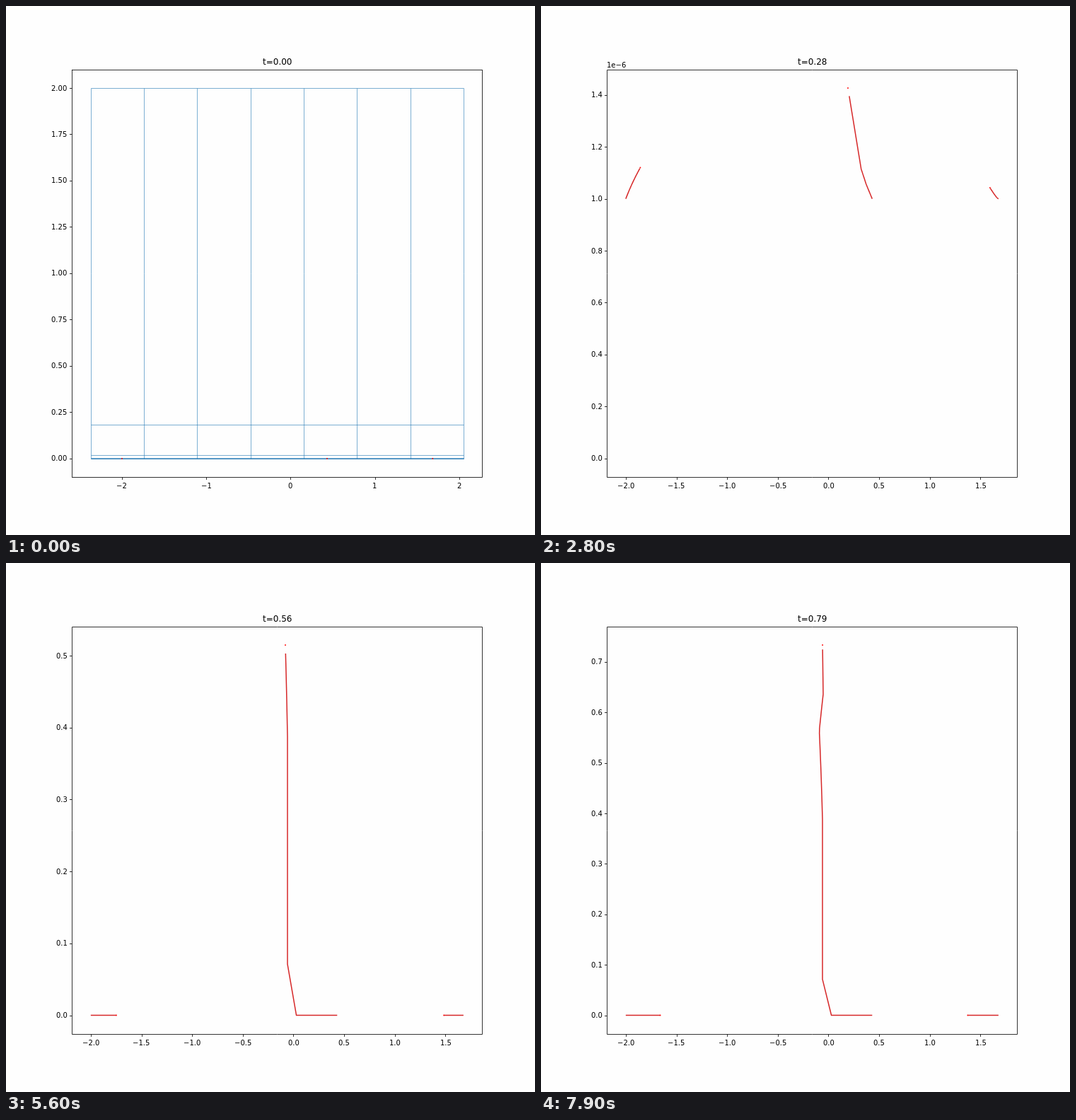
Recreate the animation shown at these times as an HTML page with a canvas. Size 748 by 748 pixels, loop 8 s.

```html
<!DOCTYPE html>
<html>
<head>
<meta charset="utf-8">
<style>
html, body { margin: 0; width: 100%; height: 100%; overflow: hidden; background: #fefefe; }
canvas { display: block; }
</style>
</head>
<body>
<canvas id="stage" width="748" height="748"></canvas>
<script>
const ctx = document.getElementById('stage').getContext('2d');
const STEPS = 80, STEP_MS = 100, JUMP = 36;
const L = 93.49, R = 673.2, T = 89.76, B = 665.72;
const X0 = 119.85, X1 = 646.85, Y0 = 639.54, Y1 = 115.94;
const MICRO = 1e-6;

const settle = u => 1 - Math.exp(-u / 8);
const snap = v => Math.floor(v + .5) + .5;

// Linear interpolation through [step, value] points
function along(n, ...points) {
  const i = Math.max(1, points.findIndex(p => p[0] >= n));
  const [a, from] = points[i - 1], [b, to] = points[i];
  return from + (to - from) * (n - a) / (b - a);
}

// Each particle gives its horizontal pixel and its height at step n
const leftParticle = n => [
  X0 + .55 * n + 5.3 * settle(n),
  MICRO * (1 + .0027 * n + .046 * settle(n))
];
const rightParticle = n => [
  X1 - .36 * n - .0024 * n * n,
  MICRO * (1 + .0004 * n ** 1.4)
];
function middleParticle(n) {
  const u = n - JUMP;
  if (u < 0) return [
    along(n, [0, 468.3], [12, 459.8], [18, 452.7], [28, 434], [35, 410.6]),
    MICRO * along(n, [0, 1], [12, 1.056], [18, 1.115], [28, 1.427], [35, 1.75])
  ];
  return [
    along(n, [JUMP, 398], [47, 398], [60.5, 393.5], [68, 399], [STEPS, 398]),
    .0713 + .0085 * u + .298 * settle(u)
  ];
}
const paths = [leftParticle, middleParticle, rightParticle]
  .map(particle => Array.from({ length: STEPS }, (_, n) => particle(n)));

function segment(x0, y0, x1, y1) {
  ctx.beginPath();
  ctx.moveTo(x0, y0);
  ctx.lineTo(x1, y1);
  ctx.stroke();
}

// Anchor: 0 left, .5 centre, 1 right
function text(s, x, y, anchor, size = 10) {
  ctx.font = size + 'px "DejaVu Sans", sans-serif';
  ctx.fillText(s, Math.round(x - anchor * ctx.measureText(s).width), y);
}

// At most nine intervals, each a round number
function ticks(lo, hi) {
  const pad = (hi - lo) * .05, raw = (hi - lo + 2 * pad) / 9;
  const exp = Math.floor(Math.log10(raw)), unit = 10 ** exp;
  const m = [1, 2, 2.5, 5, 10].find(s => s * unit >= raw);
  const step = m * unit, values = [];
  for (let i = Math.ceil((lo - pad) / step); i * step <= hi + pad; i++) values.push(i * step);
  const top = Math.max(...values.map(Math.abs));
  const order = Math.floor(Math.log10(top) + 1e-9), power = order <= -5 ? order : 0;
  const digits = Math.max(0, power - exp + (m === 2.5 ? 1 : m === 10 ? -1 : 0));
  const label = v => (v / 10 ** power).toFixed(digits).replace('-', '\u2212');
  return { values, label, power };
}

function axes(xLo, xHi, yHi, n) {
  ctx.strokeStyle = ctx.fillStyle = '#000';
  ctx.lineWidth = .8;
  ctx.strokeRect(snap(L), snap(T), snap(R) - snap(L), snap(B) - snap(T));
  const xs = ticks(xLo, xHi), ys = ticks(0, yHi);
  for (const v of xs.values) {
    const x = X0 + (v - xLo) / (xHi - xLo) * (X1 - X0);
    segment(snap(x), B + .7, snap(x), B + 4.2);
    text(xs.label(v), x, 682, .5);
  }
  for (const v of ys.values) {
    const y = Y0 + v / yHi * (Y1 - Y0);
    segment(L - 3.5, snap(y), L, snap(y));
    text(ys.label(v), L - 7, Math.round(y + 3.6), 1);
  }
  if (ys.power) text('1e\u2212' + -ys.power, L, 87, 0);
  text('t=' + (n / 100).toFixed(2), (L + R) / 2, 83, .5, 12);
}

function mesh() {
  ctx.strokeStyle = 'rgba(31,119,180,.58)';
  ctx.lineWidth = 1;
  for (let i = 0; i < 8; i++) {
    const x = snap(X0 + i * (X1 - X0) / 7);
    segment(x, snap(Y1), x, snap(Y0));
  }
  for (let k = 0; k < 7; k++) {
    const y = snap(Y0 + (Y1 - Y0) * 11.05 ** -k);
    segment(snap(X0), y, snap(X1), y);
  }
}

function dot(x, y) {
  ctx.fillStyle = '#f00';
  ctx.beginPath();
  ctx.arc(x, y, .95, 0, 7);
  ctx.fill();
}

function trails(n, yHi) {
  const py = y => Y0 + y / yHi * (Y1 - Y0);
  ctx.strokeStyle = '#d62728';
  ctx.lineWidth = 1.5;
  ctx.lineJoin = 'round';
  for (const path of paths) {
    ctx.beginPath();
    for (const [x, y] of path.slice(0, n)) ctx.lineTo(x, py(y));
    ctx.stroke();
    dot(path[n][0], py(path[n][1]));
  }
}

function draw(n) {
  ctx.fillStyle = '#fefefe';
  ctx.fillRect(0, 0, 748, 748);
  if (n === 0) {
    mesh();
    for (const x of [164, 454, 603.3]) dot(x, Y0 + .4);
    axes(-2.368, 2.05, 2, n);
  } else {
    const yHi = Math.max(...paths.flatMap(path => path.slice(0, n + 1).map(p => p[1])));
    trails(n, yHi);
    axes(-2, 1.677, yHi, n);
  }
}

function tick() {
  draw(Math.floor(performance.now() / STEP_MS) % STEPS);
  requestAnimationFrame(tick);
}
tick();
</script>
</body>
</html>
```
